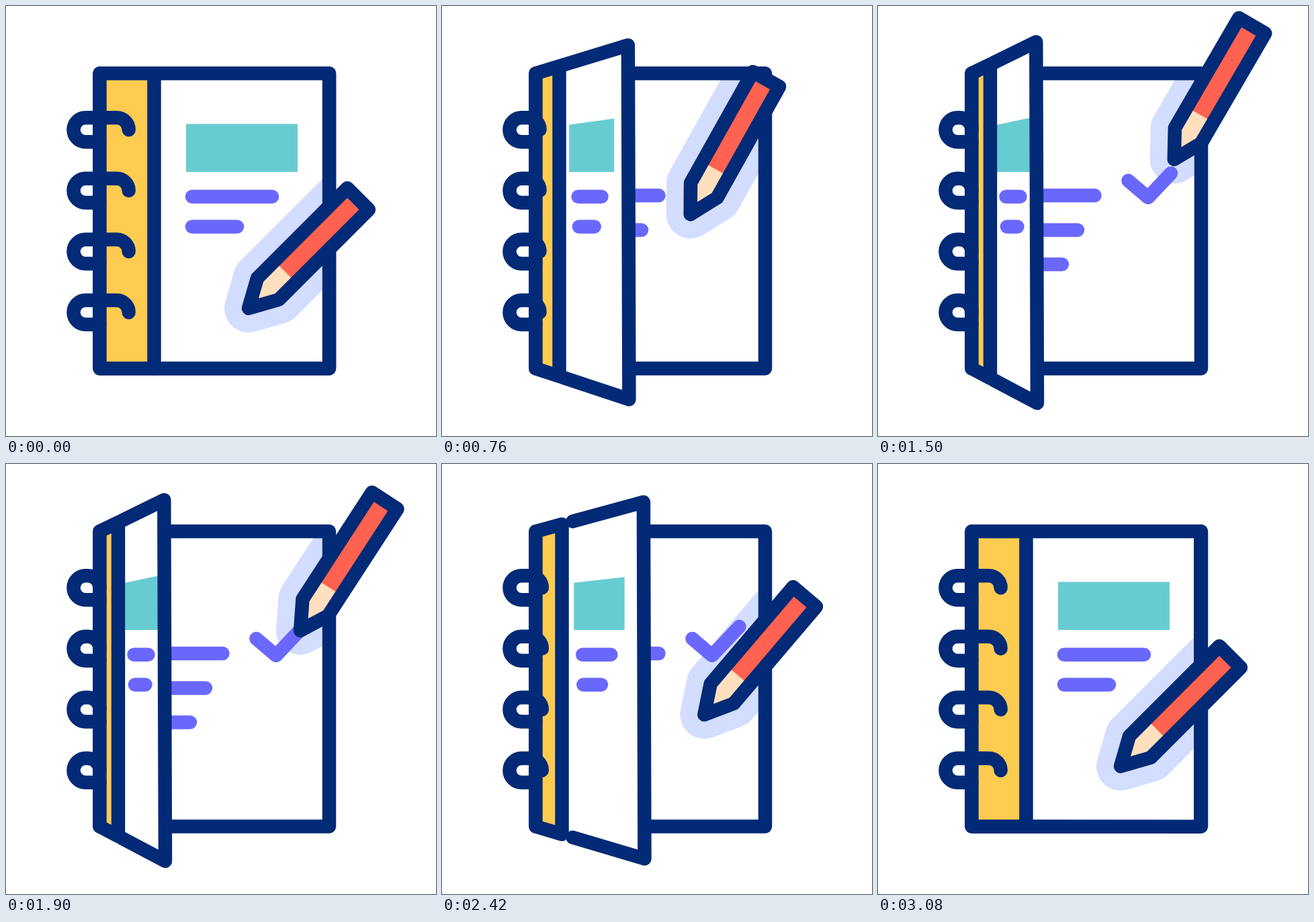
Animation of 640x640 px, one loop 3.6 s. Source, as an HTML page with a canvas:

```html
<!DOCTYPE html>
<html lang="en">
<head>
<meta charset="utf-8">
<title>Notebook and pencil</title>
<style>
  html, body { margin: 0; width: 100%; height: 100%; overflow: hidden; background: #fff; }
  canvas { display: block; width: 100vw; height: 100vh; }
</style>
</head>
<body>
<canvas id="stage" width="640" height="640"></canvas>
<script>
const ctx = document.getElementById('stage').getContext('2d');
const LOOP = 3600;
const INK = '#032a76', YELLOW = '#fecb51', TEAL = '#67ccd1', VIOLET = '#6a68fc';
const RED = '#ff6250', WOOD = '#ffdfbd', GLOW = '#d3ddff', PAPER = '#fff';
const LEFT = 139.5, RIGHT = 481, TOP = 100.3, BOTTOM = 539.5, LINE = 20.5;

const mix = (a, b, k) => a + (b - a) * k;
const ramp = (t, a, b) => Math.min(1, Math.max(0, (t - a) / (b - a)));
const smooth = x => x * x * (3 - 2 * x);

function trace(points, closed) {
  ctx.beginPath();
  points.forEach(([x, y]) => ctx.lineTo(x, y));
  if (closed) ctx.closePath();
}

function fill(points, color) {
  trace(points, true);
  ctx.fillStyle = color;
  ctx.fill();
}

function stroke(points, color, closed = false, width = LINE) {
  trace(points, closed);
  ctx.strokeStyle = color;
  ctx.lineWidth = width;
  ctx.stroke();
}

// Pencil poses: time, tip x, tip y, tilt in degrees.
const POSES = [
  [200, 361, 450, 45],
  [1080, 373.5, 250, 22.5],
  [1235, 402, 274, 25.9],
  [1600, 449.5, 218, 31.2],
  [2935, 361, 450, 45]
];

function pencilPose(t) {
  let pose = POSES[0].slice(1);
  for (let i = 1; i < POSES.length; i++) {
    const from = POSES[i - 1], to = POSES[i];
    if (t >= from[0]) {
      const k = smooth(ramp(t, from[0], to[0]));
      pose = [1, 2, 3].map(n => mix(from[n], to[n], k));
    }
  }
  return pose;
}

// Maps (side, along) on the pencil to stage coordinates.
function pencilSpace([x, y, tilt]) {
  const a = tilt * Math.PI / 180, s = Math.sin(a), c = Math.cos(a);
  return ([side, along]) => [x + side * c + along * s, y + side * s - along * c];
}

const BODY = [[0, 0], [-22.6, 41], [-22.6, 230.5], [22.6, 230.5], [22.6, 41]];
const LACQUER = [[-22.6, 77], [-22.6, 230.5], [22.6, 230.5], [22.6, 77]];

function drawGlow(region, body) {
  ctx.save();
  trace(region, true);
  ctx.clip();
  fill(body, GLOW);
  stroke(body, GLOW, true, 72);
  ctx.restore();
}

function drawCheck(t) {
  if (t <= 1080) return;
  const a = [372.5, 260], b = [402, 285], c = [442.5, 242];
  const first = Math.hypot(b[0] - a[0], b[1] - a[1]);
  const second = Math.hypot(c[0] - b[0], c[1] - b[1]);
  const drawn = smooth(ramp(t, 1080, 1600)) * (first + second);
  const along = (p, q, k) => [mix(p[0], q[0], k), mix(p[1], q[1], k)];
  const points = [a, along(a, b, Math.min(1, drawn / first))];
  if (drawn > first) points.push(along(b, c, (drawn - first) / second));
  stroke(points, VIOLET);
}

function drawBack(t, body) {
  const page = [[LEFT, TOP], [RIGHT, TOP], [RIGHT, BOTTOM], [LEFT, BOTTOM]];
  fill(page, PAPER);
  drawGlow(page, body);
  [[282, 322.5], [333.5, 297], [384.5, 274]].forEach(([y, end]) =>
    stroke([[230, y], [end, y]], VIOLET));
  drawCheck(t);
  stroke(page, INK, true);
}

function drawRing(y, hook) {
  ctx.beginPath();
  ctx.moveTo(hook, y);
  ctx.arc(hook - 18, y, 18, 0, -Math.PI / 2, true);
  ctx.lineTo(118.5, y - 18);
  ctx.arc(118.5, y, 18, -Math.PI / 2, Math.PI / 2, true);
  ctx.lineTo(LEFT, y + 18);
  ctx.strokeStyle = INK;
  ctx.lineWidth = LINE;
  ctx.stroke();
}

// How far the cover is open, and how far its free edge has swung and grown.
function coverState(t) {
  const closing = t > 2000;
  const raw = closing ? 1 - ramp(t, 2135, 3085) : ramp(t, 200, 933);
  const open = smooth(raw);
  const swing = mix(open, raw, closing ? 0.56 : 0.3);
  const grow = swing + (closing ? 1.36 : 0.55) * swing * swing * (1 - swing);
  const gap = 5 * open + (closing ? 62 * swing * (1 - swing) : 0);
  return { open, swing, grow, gap };
}

function drawCover(t, body) {
  const { open, swing, grow, gap } = coverState(t);
  const edge = mix(RIGHT, 235.3, swing);
  const edgeLow = edge + 1.7 * grow;
  const edgeTop = mix(TOP, 53.5, grow), edgeBottom = mix(BOTTOM, 591, grow);
  const top = x => [x, mix(TOP, edgeTop, (x - LEFT) / (edge - LEFT))];
  const bottom = x => [x, mix(BOTTOM, edgeBottom, (x - LEFT) / (edgeLow - LEFT))];
  const spine = mix(220.5, 167, open);
  const corners = [[edge, edgeTop], [edgeLow, edgeBottom]];
  const page = [top(spine), ...corners, bottom(spine)];
  const band = [[LEFT, TOP], top(spine), bottom(spine), [LEFT, BOTTOM]];

  fill(page, PAPER);
  drawGlow(page, body);

  const picLeft = mix(268, 176.4, open), picRight = mix(434, 227, open);
  fill([[picLeft, mix(175.5, 177, open)], [picRight, mix(175.5, 166.2, open)],
        [picRight, 247], [picLeft, 247]], TEAL);
  stroke([[mix(277, 190.5, open), 283.7], [mix(396, 211.5, open), 283.7]], VIOLET);
  stroke([[mix(277, 192, open), 328.5], [mix(344, 207.5, open), 328.5]], VIOLET);

  fill(band, YELLOW);
  stroke([top(spine + gap), ...corners, bottom(spine + gap)], INK);
  stroke(band, INK, true);
  for (let i = 0; i < 4; i++) drawRing(184.2 + 90.6 * i, mix(182.7, LEFT, open));
}

function drawPencil(place, body) {
  fill(body, WOOD);
  fill(LACQUER.map(place), RED);
  stroke(body, INK, true);
}

function render(t) {
  ctx.fillStyle = PAPER;
  ctx.fillRect(0, 0, 640, 640);
  ctx.lineCap = ctx.lineJoin = 'round';
  const place = pencilSpace(pencilPose(t));
  const body = BODY.map(place);
  drawBack(t, body);
  drawCover(t, body);
  drawPencil(place, body);
}

let start = null;
function tick(now) {
  if (start === null) start = now;
  render((now - start) % LOOP);
  requestAnimationFrame(tick);
}
render(0);
requestAnimationFrame(tick);
</script>
</body>
</html>
```
